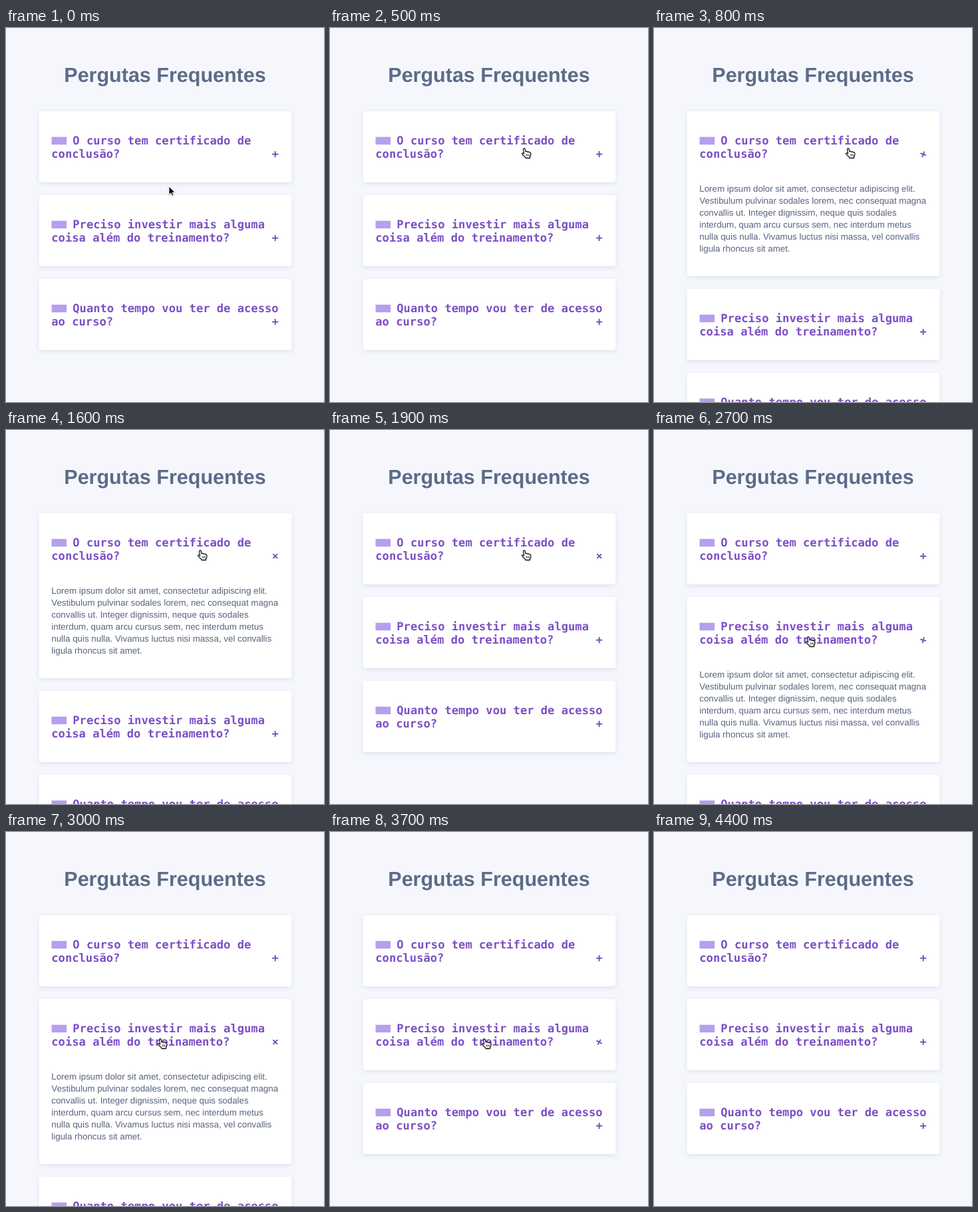
These frames come from a looping animation (478x562 px, 5 s). An HTML page:

```html
<!DOCTYPE html>
<html lang="pt">
<head>
<meta charset="utf-8">
<title>Pergutas Frequentes</title>
<style>
  html, body { margin: 0; width: 100%; height: 100%; overflow: hidden; background: #f5f7fd; }
  svg { display: block; }
  text { white-space: pre; text-rendering: geometricPrecision; font-kerning: none; font-variant-ligatures: none; }
  .title { font: bold 30.5px "Liberation Sans", Arial, sans-serif; fill: #5d6b88; text-anchor: middle; }
  .question { font: bold 17.14px "DejaVu Sans Mono", monospace; fill: #7c4fc4; }
  .answer { font: 13.33px "Liberation Sans", Arial, sans-serif; fill: #576380; }
  .box { fill: #fff; filter: drop-shadow(0 2px 3px rgba(60, 70, 110, .12)); }
  .tag { fill: #b59fee; }
  #cursor { filter: drop-shadow(0 1px 1px rgba(0, 0, 0, .25)); }
</style>
</head>
<body>
<svg width="478" height="562" viewBox="0 0 478 562">
  <text class="title" x="239" y="81">Pergutas Frequentes</text>
  <g id="cards"></g>
  <g id="cursor">
    <path id="arrow" d="M0 0V12.6L2.9 9.9 4.7 14.2 6.9 13.3 5.1 9.1H9Z" stroke="#fff"/>
    <g id="hand" transform="translate(-4 0)" stroke="#000" stroke-linejoin="round">
      <path fill="#fff" stroke-width="1.1" d="M3.6 9L2.7 2.6C2.4 .6 4.8 .3 5.2 2L6.2 6C6.6 5 8.4 5 8.8 6.4C9.3 5.4 10.9 5.6 11.2 7C12 6.2 13.6 6.7 13.8 8.2C14.1 10.5 13.6 12 12.6 13.4L12.4 15.4H6.2C5.8 13.6 3.2 11.8 1 9.6C0 8.3 1.5 7.2 2.6 8.2Z"/>
      <path fill="none" stroke-width=".8" d="M7.3 9.5v3M9.3 9.5v3M11.3 9.5v3"/>
    </g>
  </g>
</svg>
<script>
const LOOP = 5000, STEP = 100, TURN = 300;
const LEFT = 49.5, TOP = 125, WIDTH = 380, CLOSED = 107, OPEN = 248, GAP = 19;

const questions = [
  { lines: ['O curso tem certificado de', 'conclusão?'], open: 720, close: 1900 },
  { lines: ['Preciso investir mais alguma', 'coisa além do treinamento?'], open: 2640, close: 3640 },
  { lines: ['Quanto tempo vou ter de acesso', 'ao curso?'], open: Infinity, close: Infinity },
];
const answer = [
  'Lorem ipsum dolor sit amet, consectetur adipiscing elit.',
  'Vestibulum pulvinar sodales lorem, nec consequat magna',
  'convallis ut. Integer dignissim, neque quis sodales',
  'interdum, quam arcu cursus sem, nec interdum metus',
  'nulla quis nulla. Vivamus luctus nisi massa, vel convallis',
  'ligula rhoncus sit amet.',
];
// Pointer tip: time, x, y
const path = [
  [0, 245, 238], [500, 292, 180], [1900, 292, 180], [2400, 226, 339],
  [2500, 232, 310], [3700, 232, 310], [4200, 11, 56], [4300, 8, 39],
];

const $ = id => document.getElementById(id);
const clamp = v => Math.min(1, Math.max(0, v));
const easeOut = p => 1 - (1 - clamp(p)) ** 2;
const smooth = p => p * p * (3 - 2 * p);
const show = (el, on) => el.setAttribute('visibility', on ? 'inherit' : 'hidden');
const text = (cls, x, y, s) => `<text class="${cls}" x="${x}" y="${y}">${s}</text>`;

$('cards').innerHTML = questions.map(({ lines }) => `<g>
  <rect class="box" x="${LEFT}" width="${WIDTH}" height="${CLOSED}" rx="4"/>
  <rect class="tag" x="68.5" y="38.7" width="22.6" height="11.5"/>
  ${text('question', 100.3, 50.2, lines[0])}
  ${text('question', 68.3, 70.2, lines[1])}
  <g class="sign">${text('question', 399.6, 70.2, '+')}</g>
  <g class="body">${answer.map((s, i) => text('answer', 68.3, 120.6 + 18 * i, s)).join('')}</g>
</g>`).join('');
const cards = [...$('cards').children];

function pointerAt(t) {
  const i = path.findIndex(p => p[0] > t);
  if (i < 0) return path.at(-1).slice(1);
  const [t0, x0, y0] = path[i - 1], [t1, x1, y1] = path[i];
  const p = smooth((t - t0) / (t1 - t0));
  return [x0 + (x1 - x0) * p, y0 + (y1 - y0) * p];
}

function draw(t) {
  const [px, py] = pointerAt(t);
  let y = TOP, hover = false;
  questions.forEach(({ open, close }, i) => {
    const card = cards[i];
    const isOpen = t >= open && t < close;
    const height = isOpen ? OPEN : CLOSED;
    const angle = t < open ? 0 : 45 * (easeOut((t - open) / TURN) - easeOut((t - close) / TURN));
    card.setAttribute('transform', `translate(0 ${y})`);
    card.querySelector('.box').setAttribute('height', height);
    card.querySelector('.sign').setAttribute('transform', `rotate(${angle} 404.8 64.6)`);
    show(card.querySelector('.body'), isOpen);
    hover ||= px > LEFT && px < LEFT + WIDTH && py > y && py < y + height;
    y += height + GAP;
  });
  $('cursor').setAttribute('transform', `translate(${px} ${py})`);
  show($('cursor'), t < 4400);
  show($('hand'), hover);
  show($('arrow'), !hover);
}

const start = performance.now();
function tick() {
  const t = (performance.now() - start) % LOOP;
  draw(Math.floor(t / STEP) * STEP);
  requestAnimationFrame(tick);
}
tick();
</script>
</body>
</html>
```
